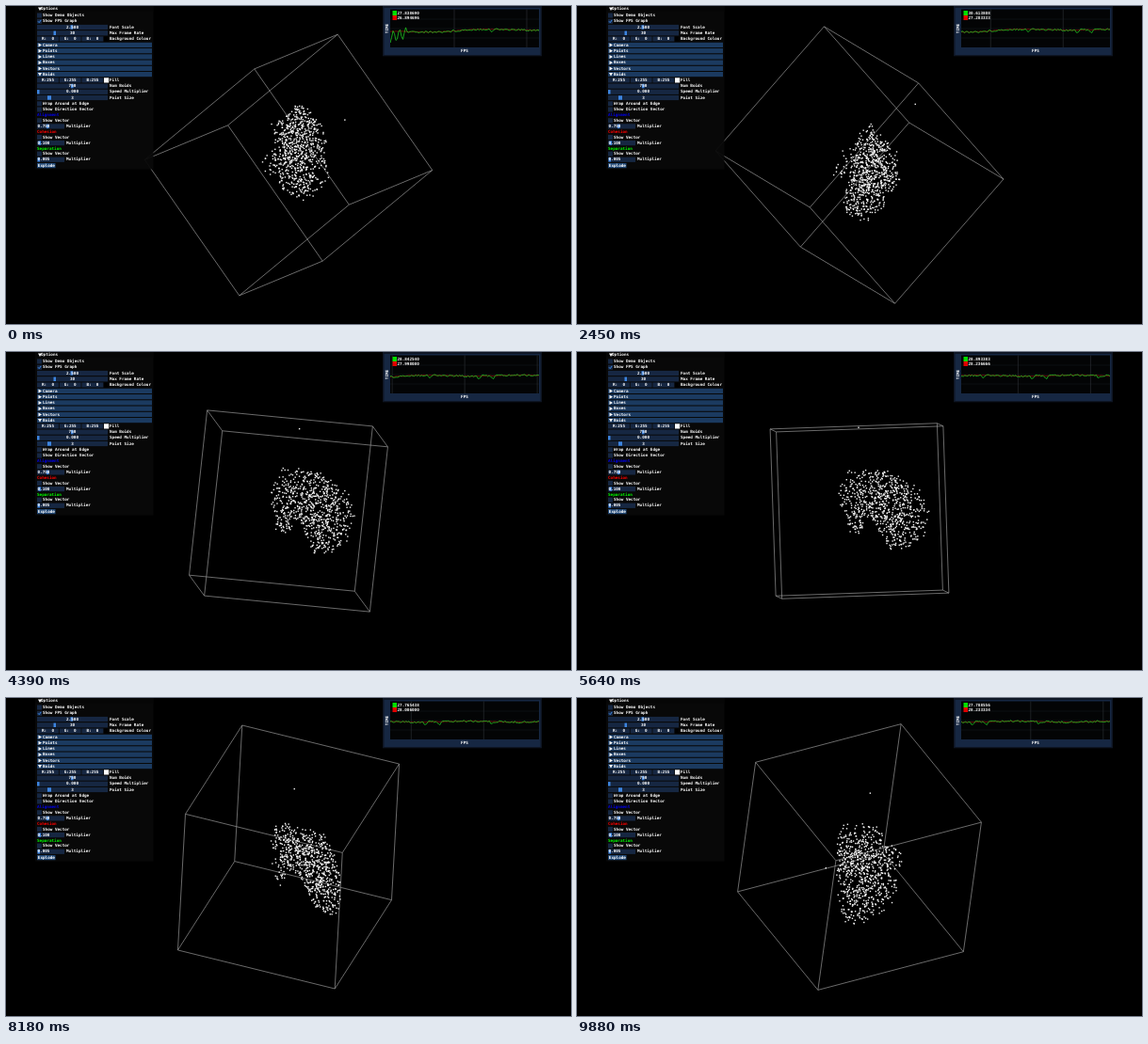
Animation, 600 px wide and 338 px high, one loop 9910 ms. Source, as an HTML page with a canvas:

```html
<!DOCTYPE html>
<html lang="en">
<head>
<meta charset="utf-8">
<title>Boids</title>
<style>
  html, body { margin: 0; width: 100%; height: 100%; overflow: hidden; background: #000; }
  canvas { display: block; }
</style>
</head>
<body>
<canvas id="stage" width="600" height="338"></canvas>
<script>
const ctx = document.getElementById('stage').getContext('2d');
const LOOP = 9910, SIDE = 177.5, HALF = SIDE / 2;
const FRAME = '#162742', HEADER = '#1b3a60', BUTTON = '#1f4674', GRAB = '#3d85e0';

// Screen x and y of the three cube axes, an easing power towards the pose,
// both FPS readings, and for some poses the outline of the flock.
const poses = [
  { t: 0,    x: [88, 100, -116], y: [-37, 144, 97],  ease: 1,   fps: [27.838690, 26.894696],
    outline: 'M8-64L20-65 27-54 38-38 42-12 43 23 30 28 27 38 6 38-4 27-16 19-31 0-23-22-18-42-2-54Z' },
  { t: 1120, x: [88, 100, -116], y: [38, 117, 130],  ease: 1,   fps: [29.840857, 28.263514] },
  { t: 2450, x: [90, 100, -115], y: [102, 60, 132],  ease: 1,   fps: [30.613808, 27.283333],
    outline: 'M3-45L18-46 24-28 36-26 42-14 39 3 44 16 38 28 28 40 22 54 10 62-6 60-17 52-18 36-16 24-29 17-31 8-25-13-12-12-8-26Z' },
  { t: 4390, x: [175, 16, -19],  y: [17, 22, 176],   ease: 1.5, fps: [28.842540, 27.998080] },
  { t: 5640, x: [177, 6.5, 6],   y: [-7, 3, 177],    ease: 0.8, fps: [28.893383, 28.236666],
    outline: 'M-22-20L-16-41-3-46 12-43 30-45 48-38 63-24 75-9 77 15 67 32 50 40 33 43 27 32 19 18 10 8 4 4 3 25-8 29-15 26-11 9-21-5Z' },
  { t: 8180, x: [166, 60, -8],   y: [40, -95, 145],  ease: 0.6, fps: [27.765438, 28.086000],
    outline: 'M-15-36L-3-38 26-28 46-23 49 0 55 20 55 58 47 66 36 65 24 46 16 32 8 18-2 15-5 32-12 33-18 16-20-10Z' },
  { t: 9880, x: [85, 154, -19],  y: [104, -42, 138], ease: 1,   fps: [27.788556, 28.233334],
    outline: 'M-28-30L-14-36-2-39 14-35 24-28 28-14 50-10 46 8 38 20 42 40 26 60 4 70-16 73-24 68-27 20-20 8-25-10Z' }
];

const dot = (p, q) => p[0] * q[0] + p[1] * q[1] + p[2] * q[2];
const unit = p => p.map(v => v / Math.hypot(...p));
const mix = (p, q, k) => p.map((v, i) => v + (q[i] - v) * k);
const hash = n => { const v = Math.sin(n * 12.9898) * 43758.5453; return v - Math.floor(v); };

function poseAt(t) {
  let i = 1;
  while (i < poses.length - 1 && t >= poses[i].t) i++;
  const from = poses[i - 1], to = poses[i];
  const k = Math.min(1, (t - from.t) / (to.t - from.t));
  const turn = k ** to.ease;
  const x = unit(mix(from.x, to.x, turn));
  const yRaw = mix(from.y, to.y, turn);
  const lean = dot(x, yRaw);
  return { x, y: unit(yRaw.map((v, j) => v - lean * x[j])), fps: mix(from.fps, to.fps, k) };
}

// The flock fills the solid whose shadow fits every outline.
function makeFlock() {
  const views = poses.filter(p => p.outline)
    .map(p => ({ ...poseAt(p.t), shape: new Path2D(p.outline) }));
  const flock = [[2, 1, -HALF], [9.5, -47, -6]];
  for (let n = 1; flock.length < 740 && n < 400000; n += 3) {
    const p = [hash(n) * 104 - 25, hash(n + 1) * 130 - 78, hash(n + 2) * 96 - 49];
    if (views.every(v => ctx.isPointInPath(v.shape, dot(v.x, p), dot(v.y, p)))) flock.push(p);
  }
  return flock;
}
const flock = makeFlock();

function box(x, y, w, h, color) {
  ctx.fillStyle = color;
  ctx.fillRect(x, y, w, h);
}
function text(s, x, y, color = '#fff', align = 'left') {
  ctx.font = 'bold 4.3px "DejaVu Sans Mono", monospace';
  ctx.textAlign = align;
  ctx.textBaseline = 'middle';
  ctx.fillStyle = color;
  ctx.fillText(s, x, y);
}
function line(points, color, width) {
  ctx.beginPath();
  points.forEach(p => ctx.lineTo(p[0], p[1]));
  ctx.strokeStyle = color;
  ctx.lineWidth = width;
  ctx.stroke();
}

function drawScene({ x, y }) {
  const project = p => [300 + dot(x, p), 169 + dot(y, p)];
  for (let axis = 0; axis < 3; axis++)
    for (const u of [-HALF, HALF])
      for (const v of [-HALF, HALF]) {
        const start = [0, 0, 0];
        start[(axis + 1) % 3] = u;
        start[(axis + 2) % 3] = v;
        const end = [...start];
        start[axis] = -HALF;
        end[axis] = HALF;
        line([project(start), project(end)], '#989898', 0.7);
      }
  for (const p of flock) {
    const [px, py] = project(p);
    box(px - 0.7, py - 0.7, 1.4, 1.4, '#f4f4f4');
  }
}

function arrow(y, open) {
  ctx.beginPath();
  if (open) { ctx.moveTo(34, y - 1.5); ctx.lineTo(38, y - 1.5); ctx.lineTo(36, y + 2); }
  else { ctx.moveTo(34.5, y - 2); ctx.lineTo(38, y); ctx.lineTo(34.5, y + 2); }
  ctx.fillStyle = '#fff';
  ctx.fill();
}
function header(label, y, open) {
  box(33, y - 2.6, 122, 5.2, HEADER);
  arrow(y, open);
  text(label, 39, y);
}
function checkbox(label, y, on) {
  box(33, y - 2.5, 5, 5, FRAME);
  if (on) line([[34, y], [35.2, y + 1.3], [37.3, y - 1.5]], '#4296fa', 0.9);
  text(label, 39, y);
}
function slider(label, value, y, grab, width = 75, grabWidth = 2.5) {
  box(33, y - 2.6, width, 5.2, FRAME);
  box(grab - 1, y - 2.2, grabWidth, 4.4, GRAB);
  if (width > 50) text(value, 70.5, y, '#fff', 'center');
  else text(value, 33.5, y);
  text(label, 33 + width + 2, y);
}
function colour(label, value, y, swatch) {
  ['R', 'G', 'B'].forEach((name, i) => {
    box(33 + i * 23.7, y - 2.6, 22.9, 5.2, FRAME);
    text(name + ':' + value, 44.5 + i * 23.7, y, '#fff', 'center');
  });
  box(104, y - 2.6, 5.2, 5.2, swatch);
  text(label, 110, y);
}
function rule(name, color, y, value, grab) {
  text(name, 33, y, color);
  checkbox('Show Vector', y + 5.7);
  slider('Multiplier', value, y + 11.9, grab, 29);
}

function drawOptions() {
  box(31, 0, 125.5, 173.5, 'rgba(9,9,9,0.94)');
  box(31, 0, 125.5, 6, '#060606');
  arrow(3, true);
  text('Options', 37, 3);
  checkbox('Show Demo Objects', 10);
  checkbox('Show FPS Graph', 16.3, true);
  slider('Font Scale', '2.500', 22.5, 69.5);
  slider('Max Frame Rate', '30', 28.8, 51.5);
  colour('Background Colour', '  0', 35, '#000');
  ['Camera', 'Points', 'Lines', 'Boxes', 'Vectors'].forEach((s, i) => header(s, 41.4 + i * 6.25, false));
  header('Boids', 72.6, true);
  colour('Fill', '255', 78.9, '#fff');
  slider('Num Boids', '750', 85.1, 70);
  slider('Speed Multiplier', '0.000', 91.3, 34);
  slider('Point Size', '3', 97.5, 45, 75, 4);
  checkbox('Wrap Around at Edge', 103.8);
  checkbox('Show Direction Vector', 110);
  rule('Alignment', '#0000e8', 116, '0.750', 44);
  rule('Cohesion', '#ff0000', 133.7, '0.100', 35.5);
  rule('Separation', '#00ff00', 151.4, '0.005', 34.5);
  box(33, 167, 19.5, 5.2, BUTTON);
  text('Explode', 33.8, 169.6);
}

function smoothLevel(s) {
  return 27.3 - 2.2 / (1 + Math.exp((478 - s) / 9)) + 0.5 * Math.sin(s / 17);
}
function rateLevel(s, n) {
  if (s < 427) return 33 + 6 * Math.cos((s - 408) * 0.95) - (s - 408) * 0.25;
  const dip = [516, 568, 583, 638].reduce((d, c) => d + 3 * Math.exp(-((s - c) ** 2) / 2), 0);
  return smoothLevel(s) + (hash(n) - 0.5) * 2.2 + dip;
}

function drawGraph(t, fps) {
  const shift = t * 0.015, step = 1.5;
  box(400, 0, 169, 53.3, '#0e1624');
  box(401.5, 2, 166, 50, FRAME);
  box(408, 3.5, 158, 40.5, '#030405');
  ctx.save();
  ctx.beginPath();
  ctx.rect(408, 3.5, 158, 40.5);
  ctx.clip();
  for (const y of [14, 24, 34]) line([[408, y], [566, y]], '#15181c', 0.5);
  for (let x = 476 - shift; x < 566; x += 77) line([[x, 3], [x, 44]], '#30343a', 0.6);
  const rate = [], average = [];
  for (let n = Math.floor((407 + shift) / step); n * step - shift < 568; n++) {
    const s = n * step, x = s - shift;
    rate.push([x, rateLevel(s, n)]);
    average.push([x, smoothLevel(s) + (hash(n + 900) - 0.5) * 0.7]);
  }
  line(average, '#b01010', 0.6);
  line(rate, '#20c820', 0.8);
  ctx.restore();
  box(410.5, 5, 4.5, 5, '#00e000');
  box(410.5, 10, 4.5, 5, '#e00000');
  text(fps[0].toFixed(6), 415.5, 7.8);
  text(fps[1].toFixed(6), 415.5, 13);
  text('FPS', 487, 48, '#fff', 'center');
  ctx.save();
  ctx.translate(405, 24);
  ctx.rotate(-Math.PI / 2);
  text('TIME', 0, 0, '#fff', 'center');
  ctx.restore();
}

const started = performance.now();
function draw() {
  const t = Math.floor(((performance.now() - started) % LOOP) / 10) * 10;
  const pose = poseAt(t);
  box(0, 0, 600, 338, '#000');
  drawScene(pose);
  drawOptions();
  drawGraph(t, pose.fps);
  requestAnimationFrame(draw);
}
draw();
</script>
</body>
</html>
```
